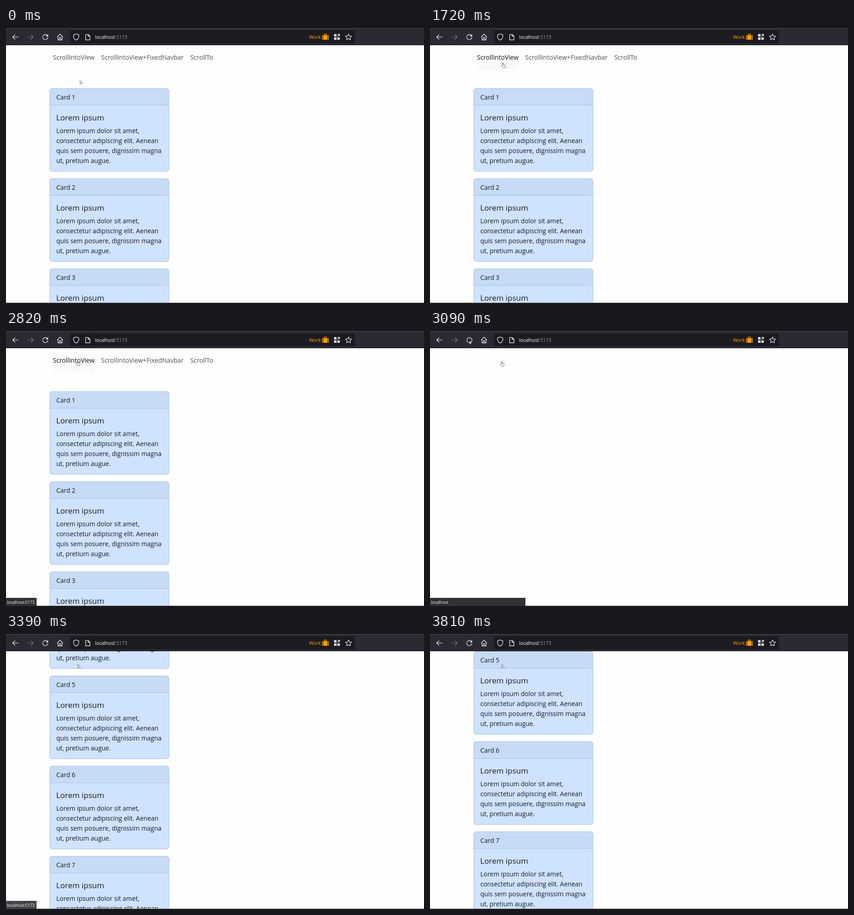
These frames come from a looping animation (922 by 607 pixels, 6130 ms). An HTML page:

```html
<!DOCTYPE html>
<html lang="en">
<head>
<meta charset="utf-8">
<title>Smooth scroll to a card</title>
<style>
  html, body { margin: 0; width: 100%; height: 100%; overflow: hidden; background: #fefefe; }
  svg { display: block; font: 13.95px "Open Sans", "Noto Sans", sans-serif; }
  .line { fill: none; stroke: #fbfbfe; stroke-width: 1.15; stroke-linecap: round; stroke-linejoin: round; }
  .cursor path { fill: #fff; stroke: #444; stroke-width: .8; stroke-linejoin: round; }
</style>
</head>
<body>
<svg width="922" height="607" viewBox="0 0 922 607">
  <g id="page" fill="#181b1f">
    <rect id="hover" x="104.5" y="59" width="91" height="33" fill="#f8f9fa"/>
    <g fill="#4d4f52" font-size="14.05">
      <text id="link" x="103.5" y="70">ScrollIntoView</text>
      <text x="210" y="70">ScrollIntoView+FixedNavbar</text>
      <text x="406.4" y="70">ScrollTo</text>
    </g>
    <g id="cards"></g>
  </g>

  <path d="M0 606.5H922" stroke="#7c7c80"/>
  <g id="status">
    <rect id="statusBox" y="589" height="18" fill="#323234"/>
    <text id="statusText" x="2.5" y="602" font-size="9" fill="#fbfbfe"></text>
  </g>

  <rect width="922" height="38" fill="#2b2a33"/>
  <path d="M0 .5H922" stroke="#4b4a54"/>
  <path d="M0 37.5H922" stroke="#111016"/>
  <rect x="141" y="5" width="629" height="29" rx="4" fill="#1c1b22"/>
  <g class="line">
    <path d="M27 20H14.7M20 14.8L14.7 20l5.3 5.2"/>
    <path d="M48 20h12.3M55 14.8l5.3 5.2-5.3 5.2" stroke="#77767d"/>
    <g id="reload">
      <path d="M91.6 17.2A5.7 5.7 0 1 0 92.3 20.8"/>
      <path d="M92.6 14.2v4h-4z" fill="#fbfbfe" stroke-width=".6"/>
    </g>
    <path d="M113.3 19.7l6-6.2 6 6.2M114.7 18.7v7.6h9.2v-7.6M117.7 26v-4.6h3.2V26"/>
    <path d="M154.8 13l5.8 2.1v3.6c0 3.6-2.4 6.4-5.8 7.9-3.4-1.5-5.8-4.3-5.8-7.9v-3.6z"/>
    <path d="M175.6 14.2h5.8l4 4v7.9h-9.8zM181.2 14.4v4h4"/>
    <path d="M755.5 13.3l2 4.2 4.7.6-3.4 3.2.9 4.6-4.2-2.2-4.2 2.2.9-4.6-3.4-3.2 4.7-.6z"/>
    <path d="M731.5 18.2l4-4M732 13.9h3.6v3.6" stroke-width="1.4"/>
  </g>
  <path d="M723.7 13.5h5.3v5.3h-5.3zM723.7 20.7h5.3V26h-5.3zM730.9 20.7h5.3V26h-5.3z" fill="#fbfbfe"/>
  <g fill="#ff9f00">
    <text x="668.4" y="23.8" font-size="10.7">Work</text>
    <path d="M697.3 15.7h1.6v10.2h-1.6zM700 15.7h8.8v10.2H700zM709.9 15.7h1.7v10.2h-1.7z"/>
    <path d="M702 16v-2.6h4.8V16" fill="none" stroke="#ff9f00" stroke-width="1.2"/>
  </g>
  <text x="196.5" y="23.7" font-size="10.5" fill="#fbfbfe">localhost<tspan fill="#9b9aa2">:5173</tspan></text>

  <g class="cursor">
    <path id="arrow" d="M.4.4v8.4l2-1.9h3.7z"/>
    <path id="hand" d="M3.2 7V1.4q0-.9.8-.9t.8.9v3l3.3.7q1.3.3 1.2 1.6l-.3 2.3-.8 2.3H4L1 7.6q-.8-1.2.3-1.4z"/>
    <path id="beam" d="M-2 .5h1.6l.4.4.4-.4H2M0 .9v9.2M-2 10.5h1.6l.4-.4.4.4H2" style="fill:none"/>
  </g>
</svg>
<script>
const $ = id => document.getElementById(id);
const LOOP = 6130, HOVER = 1720, BLANK = 3090, LOADED = 3240;
const BODY = ["Lorem ipsum dolor sit amet,", "consectetur adipiscing elit. Aenean",
  "quis sem posuere, dignissim magna", "ut, pretium augue."];

// Each step: start time, cursor, its position, status bar opacity
const STEPS = [
  [0, "arrow", 163, 115.5, 0],
  [1030, "arrow", 165, 109, 0],
  [1180, "arrow", 165, 102, 0],
  [1300, "arrow", 164.5, 93, 0],
  [1450, "arrow", 162, 86, 0],
  [1570, "arrow", 160, 81, 0],
  [1720, "hand", 157.3, 76, 0],
  [1870, "hand", 155, 69, 0],
  [2020, "hand", 154, 66, 0],
  [2270, "hand", 154, 66, .97],
  [2420, "hand", 154, 66, 1],
  [2820, "hand", 154, 65.4, 1],
  [3090, "hand", 154.3, 66.5, 1],
  [3240, "beam", 159.5, 62, .42],
  [3390, "arrow", 158, 66.5, .9],
  [3540, "arrow", 158, 66.5, .66],
  [3690, "arrow", 158, 66.5, 0],
  [3810, "arrow", 158, 66.5, 0]
];

function card(n) {
  const top = Math.round(133 + 198.75 * (n - 1));
  const lines = BODY.map((s, i) => `<text x="111" y="${98.5 + 22 * i}">${s}</text>`).join("");
  return `<g transform="translate(0 ${top})">
    <rect x="96.5" y=".5" width="263" height="183" rx="5.5" fill="#cfe2ff"/>
    <path d="M96.5 37.5V6q0-5.5 5.5-5.5h252q5.5 0 5.5 5.5v31.5z" fill="#c8dbf6"/>
    <path d="M96.5 37.5h263" stroke="#adc0de"/>
    <rect x="96.5" y=".5" width="263" height="183" rx="5.5" fill="none" stroke="#adc0de"/>
    <text x="111" y="25">Card ${n}</text>
    <text x="110.8" y="71" font-size="17.2">Lorem ipsum</text>${lines}</g>`;
}
$("cards").innerHTML = [1, 2, 3, 4, 5, 6, 7, 8].map(card).join("");

// Critically damped spring from the page top to card 5, in whole pixels
function scrollAt(t) {
  const x = Math.max(0, (t - 3110.6) * .0161);
  return Math.round(890 * (1 - (1 + x) * Math.exp(-x)));
}

const show = (id, on) => $(id).style.display = on ? "" : "none";

function draw(now) {
  const time = now % LOOP;
  const [t, cursor, x, y, opacity] = STEPS.findLast(s => s[0] <= time);
  const blank = t === BLANK, hover = t >= HOVER && t < BLANK;

  show("page", !blank);
  $("page").setAttribute("transform", `translate(0 ${t < LOADED ? 0 : -scrollAt(t)})`);
  show("hover", hover);
  $("link").setAttribute("fill", hover ? "#181818" : "#4d4f52");
  $("reload").setAttribute("transform", `rotate(${blank ? 110 : 0} 86.7 20.3)`);

  $("status").setAttribute("opacity", opacity);
  $("statusBox").setAttribute("width", blank ? 210.5 : 67.5);
  $("statusText").textContent = blank ? "localhost" : "localhost:5173";

  for (const id of ["arrow", "hand", "beam"]) show(id, id === cursor);
  $(cursor).setAttribute("transform", `translate(${x} ${y})`);
  requestAnimationFrame(draw);
}
requestAnimationFrame(draw);
</script>
</body>
</html>
```
